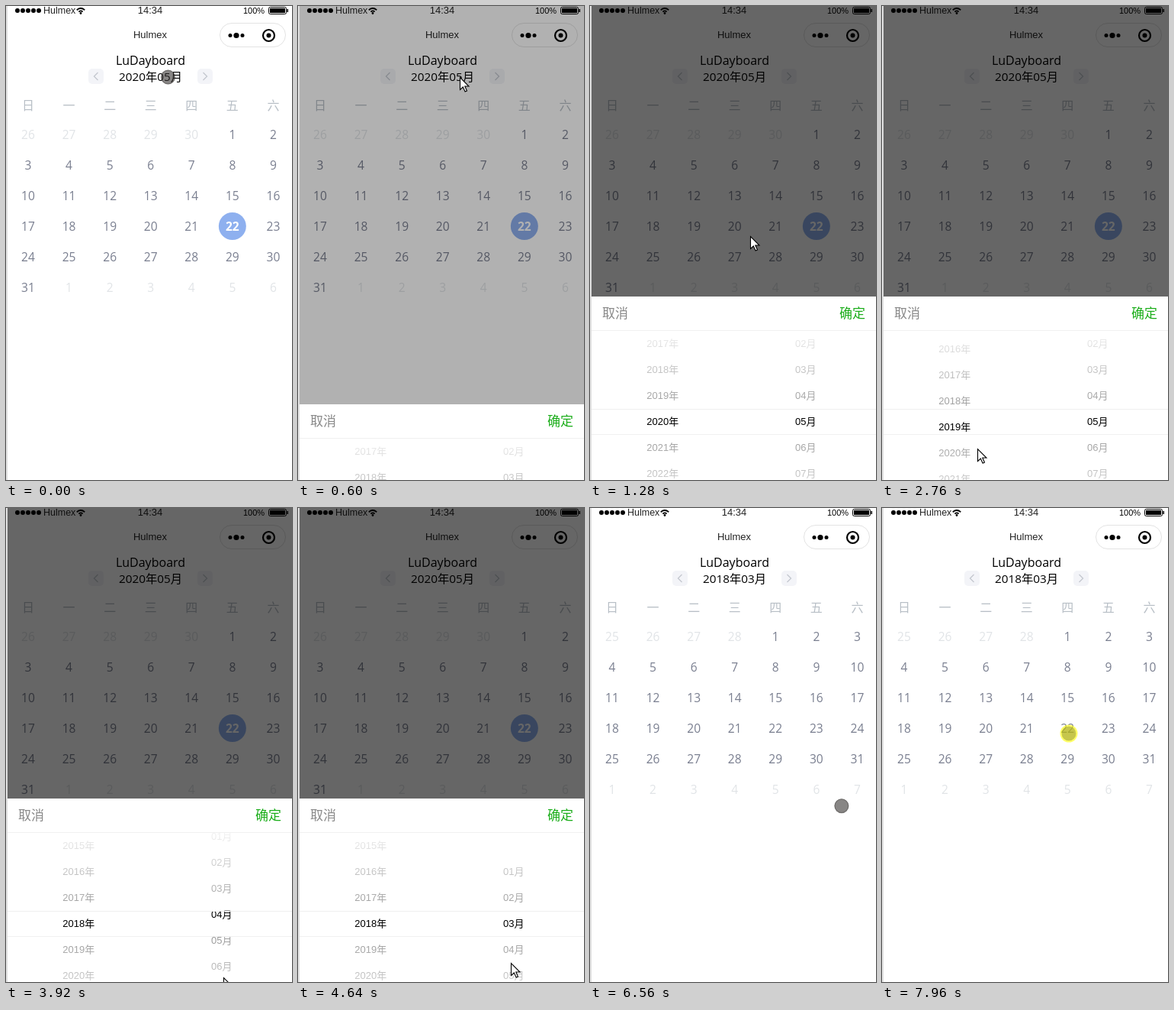
An HTML page with a canvas for the animation above (8000 ms loop, 375 by 620 pixels).

```html
<!DOCTYPE html>
<html lang="zh">
<head>
<meta charset="utf-8">
<style>
html, body { margin: 0; width: 100%; height: 100%; overflow: hidden; background: #fff; }
canvas { display: block; }
</style>
</head>
<body>
<canvas id="stage" width="375" height="620"></canvas>
<script>
const ctx = document.getElementById('stage').getContext('2d');
const LOOP = 8000, PAGE_BOTTOM = 667, ROW = 34;
const UI = '"Open Sans", "Noto Sans CJK SC", "Noto Sans CJK", sans-serif';
const SYS = '"Liberation Sans", "Noto Sans CJK SC", "Noto Sans CJK", sans-serif';

const OPEN = 511, CONFIRM = 5880;   // picker slides in, picker closes
const CLICKS = [440, 5720, 7960];
// Places the pointer glides between: time, x, y
const STOPS = [
  [900, 212.5, 93], [1280, 210, 302], [1360, 270, 265], [1760, 151, 536],
  [2240, 121, 535], [2760, 125, 580], [3080, 246, 559], [3920, 286, 615],
  [4320, 275, 566], [4600, 278, 600], [5040, 348, 412], [6320, 349, 411], [7200, 245, 295],
];

const ARROW = new Path2D('M0 0V16L3.8 12.5L6.6 18.6L9 17.5L6.3 11.5H11.5Z');
const HAND = new Path2D('M-2 1.5Q0-1 2 1.5V7.5Q4 6 5 8.2Q7 7 8 9.2Q11 8.5 11 11.5V16L8.5 20V23H0V20L-5 14.5Q-5.5 11-2 13.5Z');

const clamp = p => Math.max(0, Math.min(1, p));
const easeOut = p => 1 - (1 - clamp(p)) ** 2;
const progress = (t, from, to) => clamp((t - from) / (to - from));
const smooth = p => p * p * (3 - 2 * p);
const pad = n => String(n).padStart(2, '0');

function pointerAt(t) {
  const next = STOPS.findIndex(s => s[0] > t);
  const [t1, x1, y1] = STOPS.at(next < 0 ? -1 : next);
  const [t0, x0, y0] = STOPS.at(next < 0 ? -1 : Math.max(0, next - 1));
  const p = t1 > t0 ? smooth(progress(t, t0, t1)) : 1;
  return [x0 + (x1 - x0) * p, y0 + (y1 - y0) * p];
}

function text(str, x, y, size, color, { align = 'center', font = UI, weight = 400 } = {}) {
  ctx.font = `${weight} ${size}px ${font}`;
  ctx.textAlign = align;
  ctx.fillStyle = color;
  ctx.fillText(str, x, y);
}

function rect(x, y, w, h, color) {
  ctx.fillStyle = color;
  ctx.fillRect(x, y, w, h);
}

function disc(x, y, r, color) {
  ctx.beginPath();
  ctx.arc(x, y, r, 0, 7);
  ctx.fillStyle = color;
  ctx.fill();
}

function ring(x, y, r, width, color, from = 0, to = 7) {
  ctx.beginPath();
  ctx.arc(x, y, r, from, to);
  ctx.lineWidth = width;
  ctx.strokeStyle = color;
  ctx.stroke();
}

function roundBox(x, y, w, h, r, fill, stroke) {
  ctx.beginPath();
  ctx.roundRect(x, y, w, h, r);
  if (fill) { ctx.fillStyle = fill; ctx.fill(); }
  if (stroke) { ctx.lineWidth = 1; ctx.strokeStyle = stroke; ctx.stroke(); }
}

function arrowButton(x, y, dir) {
  roundBox(x - 10, y - 10, 20, 20, 5, '#f3f4f8');
  ctx.beginPath();
  ctx.moveTo(x - dir * 2.5, y - 5);
  ctx.lineTo(x + dir * 2.5, y);
  ctx.lineTo(x - dir * 2.5, y + 5);
  ctx.lineWidth = 1.3;
  ctx.strokeStyle = '#c3c7cf';
  ctx.stroke();
}

function drawBars() {
  for (let i = 0; i < 5; i++) disc(15 + i * 7, 6, 3, '#000');
  text('Hulmex', 49, 10, 12.5, '#222', { align: 'left', font: SYS });
  for (const r of [3.5, 7]) ring(98, 10, r, 1.8, '#000', -2.4, -0.74);
  disc(98, 9.5, 1.4, '#000');
  text('14:34', 189, 10, 13, '#222', { font: SYS });
  text('100%', 311, 10, 11, '#000', { align: 'left', font: SYS });
  roundBox(344.5, 1.5, 23, 9, 2, null, '#000');
  rect(346, 3, 20, 6, '#000');
  rect(368.5, 4, 1.5, 4, '#000');

  text('Hulmex', 189, 42, 13, '#222', { font: SYS });
  roundBox(280.5, 22.5, 86, 31, 15.5, '#fff', '#e3e3e3');
  for (const i of [-1, 0, 1]) disc(302 + i * 8, 38.5, i ? 2.5 : 3.6, '#000');
  ring(344.5, 38.5, 7.5, 2.2, '#000');
  disc(344.5, 38.5, 3, '#000');
}

function drawCalendar(year, month) {
  text('LuDayboard', 189.5, 77, 16, '#000');
  text(`${year}年${pad(month)}月`, 189.5, 98, 15.3, '#000');
  arrowButton(118, 92, -1);
  arrowButton(261, 92, 1);

  const columnX = i => 29 + 53.57 * i;
  [...'日一二三四五六'].forEach((day, i) => text(day, columnX(i), 136, 16, '#b8bfc6'));
  const lead = new Date(year, month - 1, 1).getDay();
  for (let i = 0; i < 42; i++) {
    const date = new Date(year, month - 1, 1 - lead + i);
    const x = columnX(i % 7), y = 168 + 40 * Math.floor(i / 7);
    const inMonth = date.getMonth() === month - 1;
    const selected = inMonth && year === 2020 && date.getDate() === 22;
    if (selected) disc(x, y, 18, '#8eb0ef');
    text(date.getDate(), x, y + 6, 15.6, selected ? '#fff' : inMonth ? '#7a7f90' : '#e1e4e7',
      { weight: selected ? 700 : 400 });
  }
}

// A wheel of values that turns back two rows
function drawWheel(x, top, first, last, current, turn, label) {
  const shift = Math.round(2 * ROW * smooth(turn));
  for (let n = first; n <= last; n++) {
    text(label(n), x, top + 168 + (n - current) * ROW + shift, 13, '#000', { font: SYS });
  }
}

function fade(y, h, from, to) {
  const g = ctx.createLinearGradient(0, y, 0, y + h);
  g.addColorStop(0, `rgba(255,255,255,${from})`);
  g.addColorStop(1, `rgba(255,255,255,${to})`);
  rect(2, y, 373, h, g);
}

function drawPicker(open, t) {
  rect(2, 0, 373, 620, `rgba(0,0,0,${0.6 * open})`);
  const top = Math.round(PAGE_BOTTOM - 287 * open);
  rect(2, top, 373, 287, '#fff');
  text('取消', 16, top + 28, 17, '#888', { align: 'left' });
  text('确定', 361, top + 28, 17, '#1aad19', { align: 'right' });
  ctx.save();
  ctx.beginPath();
  ctx.rect(2, top + 45, 373, 238);
  ctx.clip();
  drawWheel(95.3, top, 2012, 2025, 2020, progress(t, 2360, 3060), n => n + '年');
  drawWheel(282.8, top, 1, 12, 5, progress(t, 3440, 4700), n => pad(n) + '月');
  fade(top + 45, 102, 0.95, 0.6);
  fade(top + 181, 102, 0.6, 0.95);
  ctx.restore();
  for (const dy of [44, 147, 180]) rect(2, top + dy, 373, 1, '#f0f0f0');
}

function drawPointer(t) {
  const [x, y] = pointerAt(t);
  const pressed = CLICKS.some(c => t >= c && t < c + 80);
  if (pressed) disc(x, y, 11.5, 'rgba(255,255,0,.6)');
  if (t < 520 || t >= 6120) {
    disc(x, y, 9.5, pressed ? 'rgba(120,120,40,.42)' : 'rgba(50,46,44,.58)');
    if (!pressed) ring(x, y, 8.8, 1, 'rgba(50,46,44,.35)');
    return;
  }
  const shape = t >= 4960 ? HAND : ARROW;
  ctx.save();
  ctx.translate(Math.floor(x) + 0.5, Math.floor(y) + 0.5);
  ctx.fillStyle = '#fff';
  ctx.fill(shape);
  ctx.lineWidth = 1.1;
  ctx.strokeStyle = '#000';
  ctx.stroke(shape);
  if (shape === HAND) {
    for (let i = 0; i < 3; i++) rect(1.5 + 3 * i, 7 + i, 1, 4, '#000');
  }
  ctx.restore();
}

function draw(now) {
  const t = now % LOOP;
  rect(0, 0, 375, 620, '#fff');
  drawBars();
  if (t < CONFIRM) drawCalendar(2020, 5);
  else drawCalendar(2018, 3);
  const open = easeOut((t - OPEN) / 300) * (1 - progress(t, CONFIRM, CONFIRM + 80));
  if (open > 0) drawPicker(open, t);
  rect(0, 0, 2, 620, '#dedede');
  drawPointer(t);
  requestAnimationFrame(draw);
}
requestAnimationFrame(draw);
</script>
</body>
</html>
```
